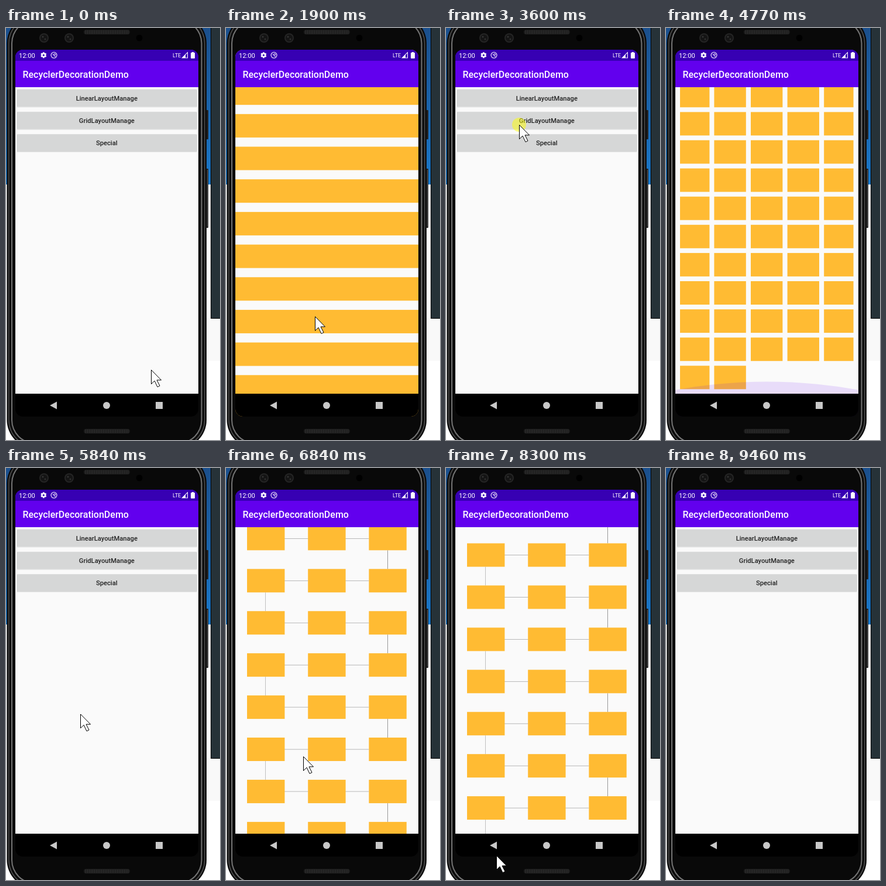
An HTML page with a canvas for the animation above (9860 ms loop, 366 by 703 pixels).

```html
<!DOCTYPE html>
<html lang="en">
<head>
<meta charset="utf-8">
<title>RecyclerDecorationDemo</title>
<style>
html, body { margin: 0; width: 100%; height: 100%; overflow: hidden; background: #fff; }
canvas { display: block; width: 366px; height: 703px; }
</style>
</head>
<body>
<canvas id="stage"></canvas>
<script>
const W = 366, H = 703, LOOP = 9860;
const BEAT = 76.91, LEAD = 24, LAST_BEAT = 123;
const AMBER = '#ffbb33', ITEMS = 52;
const LEFT = 16, TOP = 101, RIGHT = 329, BOTTOM = 624, WIDTH = RIGHT - LEFT;

const canvas = document.getElementById('stage');
const ctx = canvas.getContext('2d');
const dpr = window.devicePixelRatio || 1;
canvas.width = W * dpr;
canvas.height = H * dpr;

// Pointer stops: beat, x, y
const STOPS = [
  [0, 248, 583], [10, 204, 121], [12, 203, 120], [16, 203, 120],
  [21, 158, 608], [25, 152, 492], [28, 150, 385], [35, 95, 690], [38, 84, 646], [39, 84, 646],
  [46, 125, 165], [48, 125, 165],
  [53, 150, 608], [57, 150, 300], [61, -30, 650], [64, -30, 650], [67, 116, 614], [68, 89, 643], [71, 89, 643],
  [81, 165, 196], [83, 165, 196],
  [86, 140, 608], [89, 132, 492], [95, 132, 590], [98, 130, 350], [108, 86, 661], [109, 84, 648], [111, 84, 648],
  [121, 301, 678], [123, 320, 740]
];
const PRESSES = [14, 38, 47, 70, 82, 109];

const SCENES = [
  { at: -9, name: 'home' }, { at: 16, name: 'linear' }, { at: 39, name: 'home' }, { at: 48, name: 'grid' },
  { at: 71, name: 'home' }, { at: 83, name: 'special' }, { at: 110, name: 'home' }
];

// Scroll gestures per list: start beat, beats, distance
const FLINGS = {
  home: [],
  linear: [[21, 4, 120.2], [28, 9, 560]],
  grid: [[53, 3, 12.7]],
  special: [[86, 3, 159.5], [95, 10, 331.5]]
};

const clamp = v => Math.max(0, Math.min(1, v));
const smooth = v => v * v * (3 - 2 * v);
const easeOut = v => 1 - (1 - clamp(v)) ** 3;

const scrollAt = (name, beat) =>
  FLINGS[name].reduce((sum, [start, beats, dist]) => sum + dist * easeOut((beat - start) / beats), 0);

function pointerAt(beat) {
  const i = Math.max(1, STOPS.findIndex(s => beat <= s[0]));
  const [t0, x0, y0] = STOPS[i - 1], [t1, x1, y1] = STOPS[i];
  const p = smooth((beat - t0) / (t1 - t0));
  return [x0 + (x1 - x0) * p, y0 + (y1 - y0) * p];
}

function rect(color, x, y, w, h) {
  ctx.fillStyle = color;
  ctx.fillRect(x, y, w, h);
}

function round(color, x, y, w, h, r) {
  ctx.fillStyle = color;
  ctx.beginPath();
  ctx.roundRect(x, y, w, h, r);
  ctx.fill();
}

function disc(color, x, y, r) {
  ctx.fillStyle = color;
  ctx.beginPath();
  ctx.arc(x, y, r, 0, Math.PI * 2);
  ctx.fill();
}

function poly(color, points) {
  ctx.fillStyle = color;
  ctx.beginPath();
  points.forEach(([x, y]) => ctx.lineTo(x, y));
  ctx.closePath();
  ctx.fill();
}

function text(str, x, y, size, color, weight = 500, align = 'left') {
  ctx.font = `${weight} ${size}px Roboto, sans-serif`;
  ctx.textAlign = align;
  ctx.fillStyle = color;
  ctx.fillText(str, x, y);
}

function desktop() {
  rect('#fff', 0, 0, W, H);
  const sky = ctx.createLinearGradient(0, 0, 0, 267);
  sky.addColorStop(0, '#1b4f8c');
  sky.addColorStop(1, '#1a79cb');
  rect(sky, 0, 0, 350, 267);
  rect('#f9f9f9', 343, 495, 23, 73);
  rect('#000', 350, 0, 16, 496);
  rect('#263238', 351, 0, 15, 495);
}

function speaker(y) {
  round('#1d1d1d', 133, y, 79, 8, 4);
  for (let x = 136; x < 210; x += 3) rect('#303030', x, y + 1, 1, 6);
}

function phone() {
  round('#202020', 341, 140, 5, 50, 1);
  round('#202020', 341, 240, 5, 101, 1);
  rect('#555', 344, 242, 1, 97);
  const shell = (color, inset) =>
    round(color, 1.5 + inset, -22 + inset, 341.5 - inset * 2, 739 - inset * 2, 48 - inset);
  shell('#0a0a0a', 0);
  shell('#505050', 2.5);
  shell('#0d0d0d', 4);
  shell('#747474', 7.5);
  shell('#090909', 9.5);
  speaker(3);
  speaker(684);
  for (const x of [65, 108]) {
    disc('#252525', x, 17, 8);
    disc('#141414', x, 17, 6);
    disc('#343434', x - 2, 15, 1.5);
    disc('#303030', x + 2, 19, 1.5);
  }
  disc('#000', 228, 17, 5.5);
}

function gear(x, y) {
  for (let i = 0; i < 6; i++) {
    ctx.save();
    ctx.translate(x, y);
    ctx.rotate(i * Math.PI / 3);
    rect('#fff', -1.4, -5, 2.8, 4);
    ctx.restore();
  }
  disc('#fff', x, y, 3.8);
  disc('#3700b3', x, y, 1.6);
}

function statusBar() {
  rect('#3700b3', LEFT, 37, WIDTH, 19);
  text('12:00', 22, 51, 11.2, '#fff', 400);
  gear(64.3, 46.3);
  ctx.strokeStyle = '#fff';
  ctx.lineWidth = 1.1;
  ctx.beginPath();
  ctx.arc(82, 46.3, 5, 0, Math.PI * 2);
  ctx.moveTo(84.6, 46.3);
  ctx.arc(82, 46.3, 2.6, 0, Math.PI * 1.5, true);
  ctx.moveTo(80, 44.3);
  ctx.lineTo(84.5, 48.8);
  ctx.stroke();
  text('LTE', 285, 50, 9, '#fff', 400);
  poly('#fff', [[300, 51.5], [311, 51.5], [311, 40.5]]);
  poly('#3700b3', [[307, 50.5], [310, 50.5], [310, 43], [307, 46]]);
  round('#fff', 316, 42, 7, 10, 1);
  rect('#fff', 318, 41, 3, 2);
}

function navBar() {
  rect('#000', LEFT, BOTTOM, WIDTH, 39);
  poly('#c8c8c8', [[75, 644], [87, 637.5], [87, 650.5]]);
  disc('#c8c8c8', 172, 644, 6);
  rect('#c8c8c8', 256, 638, 12, 12);
}

const screens = {
  home() {
    ['LinearLayoutManage', 'GridLayoutManage', 'Special'].forEach((label, i) => {
      const y = 105 + i * 38.3;
      round('#e4e4e4', 18, y - 0.5, 309, 31, 2);
      round('#d6d7d7', 18.5, y, 308, 29.3, 2);
      text(label, 172.3, Math.round(y + 18.6), 11.2, '#212121', 500, 'center');
    });
  },
  linear(scroll) {
    for (let i = 0; i < ITEMS; i++) rect(AMBER, LEFT, 100 + i * 55.68 - scroll, WIDTH, 40);
  },
  grid(scroll, beat) {
    for (let i = 0; i < ITEMS; i++) {
      const col = i % 5, x = col ? 19.8 + col * 62.6 : 24;
      rect(AMBER, x, 108 + Math.floor(i / 5) * 48.1 - scroll, col % 4 ? 54.4 : 50.4, 40);
    }
    const glow = Math.sin(Math.PI * clamp((beat - 57) / 10));
    if (glow > 0) disc(`rgba(98,0,238,${0.12 * glow})`, 172.5, 625 - 21.5 * glow + 882, 882);
  },
  special(scroll) {
    const pitch = 71.93;
    for (let row = 0; row * 3 < ITEMS; row++) {
      const y = 116 + row * pitch - scroll, odd = row % 2;
      rect('#b0b0b0', 100, y + 19.6, 144.4, 0.9);
      rect(odd ? '#c0c0c0' : '#999', odd ? 67 : 276, y + 40, 1, pitch - 40);
      for (let col = 0; col < 3; col++) rect(AMBER, 36 + col * 104.2, y, 64.4, 40);
    }
  }
};

function page(name, beat, shift, alpha) {
  ctx.save();
  ctx.globalAlpha = alpha;
  ctx.translate(0, shift);
  rect('#fafafa', LEFT, 56, WIDTH, 569);
  screens[name](scrollAt(name, beat), beat);
  rect('#6200ee', LEFT, 37, WIDTH, TOP - 37);
  text('RecyclerDecorationDemo', 28.5, 84.5, 16, '#fff');
  ctx.restore();
}

function display(beat) {
  const now = SCENES.findLastIndex(s => beat >= s.at);
  const { at, name } = SCENES[now];
  const p = easeOut((beat - at + 1) / 4);
  ctx.save();
  ctx.beginPath();
  ctx.roundRect(LEFT, 37, WIDTH, 626, 13);
  ctx.clip();
  if (p === 1) {
    page(name, beat, 0, 1);
  } else {
    const closing = name === 'home', before = SCENES[now - 1].name;
    const shown = closing ? 1 - p : p;
    page('home', beat, 0, 1);
    page(closing ? before : name, beat, 26 * (1 - shown), shown);
  }
  statusBar();
  navBar();
  ctx.restore();
}

function pointer(beat) {
  const [x, y] = pointerAt(beat);
  if (PRESSES.some(b => beat === b || beat === b + 1)) disc('rgba(255,255,0,0.5)', x, y, 12);
  ctx.save();
  ctx.translate(x + 0.5, y + 0.5);
  poly('#fff', [[0, 0], [0, 24], [5.5, 18.5], [10.5, 29], [14.5, 27], [9.5, 17.3], [17, 17.3]]);
  ctx.strokeStyle = '#000';
  ctx.lineWidth = 1;
  ctx.stroke();
  ctx.restore();
}

function draw() {
  const time = performance.now() % LOOP;
  const beat = Math.min(LAST_BEAT, Math.floor((time + LEAD) / BEAT));
  ctx.setTransform(dpr, 0, 0, dpr, 0, 0);
  desktop();
  phone();
  display(beat);
  pointer(beat);
  requestAnimationFrame(draw);
}
draw();
</script>
</body>
</html>
```
